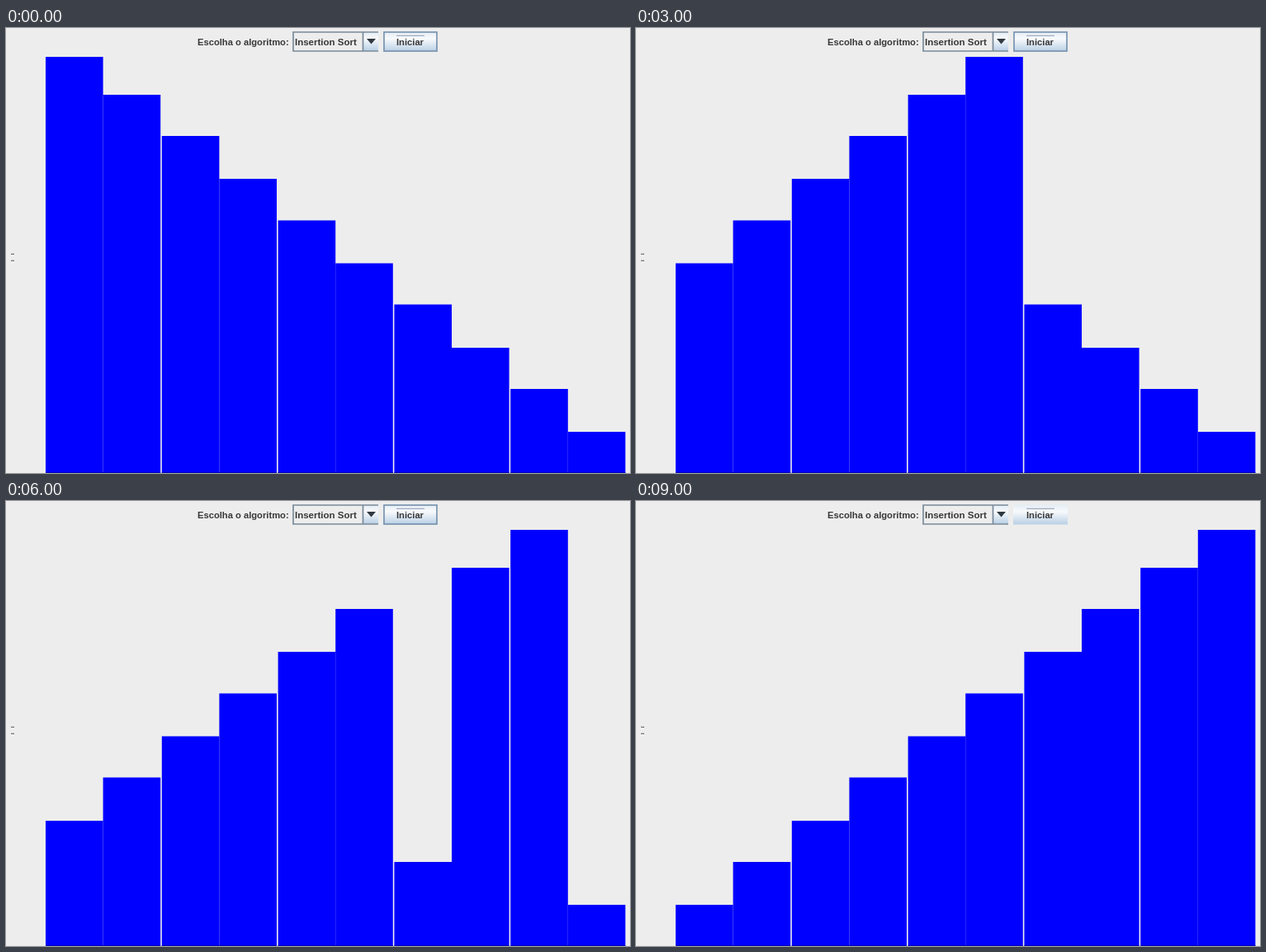
Recreate the animation shown at these times as an HTML page. Size 756 by 540 pixels, loop 9.2 s.

```html
<!DOCTYPE html>
<html lang="pt">
<head>
<meta charset="utf-8">
<title>Insertion Sort</title>
<style>
  html, body { margin: 0; width: 100%; height: 100%; overflow: hidden; background: #ededed; }
  svg { display: block; width: 756px; height: 540px; }
  text { font-family: "Liberation Sans", Arial, sans-serif; font-weight: bold; fill: #383838; }
  #frame { animation: leave 9200ms step-end infinite; }
  @keyframes leave { 0% { opacity: 1; } 73.9% { opacity: 0; } }
</style>
</head>
<body>
<svg viewBox="0 0 756 540">
  <defs>
    <linearGradient id="steel" x2="0" y2="1">
      <stop offset="0" stop-color="#e4ecf4"/>
      <stop offset=".35" stop-color="#f8fafc"/>
      <stop offset="1" stop-color="#b8cfe5"/>
    </linearGradient>
  </defs>
  <rect width="756" height="540" fill="#ededed"/>

  <path d="M6 274.5h4M6 282.5h4" stroke="#777" stroke-width="1.6"/>
  <path d="M6 276h4M6 284h4" stroke="#fff"/>

  <text x="232" y="21" font-size="11.2">Escolha o algoritmo:</text>

  <rect x="433" y="5" width="18" height="23" fill="url(#steel)"/>
  <path d="M451 5H348V28H451M432.5 5V28" fill="none" stroke="#7a8a99" stroke-width="1.7"/>
  <path d="M437 13h11l-5.5 6.5z" fill="#303840"/>
  <text x="350" y="20.5" font-size="11.5">Insertion Sort</text>

  <rect x="457" y="4.5" width="66" height="24" fill="url(#steel)"/>
  <rect id="frame" x="458" y="5" width="64" height="23" fill="none" stroke="#7a94b0" stroke-width="1.7"/>
  <path d="M473 9.3h34" stroke="#8c9db2"/>
  <text x="473" y="21" font-size="11.2">Iniciar</text>

  <g id="bars" fill="#00f"></g>
  <path id="base" stroke="#0000b4"/>
</svg>
<script>
const STEP = 200, LOOP = 9200;
const tops = [490, 438, 388, 335.5, 285.5, 233.5, 183, 131, 81, 35];
const group = document.getElementById("bars");

// Bars touch in pairs, with a thin gap between the pairs.
const bars = tops.map((_, i) => {
  const bar = document.createElementNS("http://www.w3.org/2000/svg", "rect");
  bar.setAttribute("x", 48 + 140.8 * (i >> 1) + 69.6 * (i % 2));
  bar.setAttribute("width", 69.6);
  return group.appendChild(bar);
});
document.getElementById("base").setAttribute("d",
  [0, 1, 2, 3, 4].map(k => `M${48 + 140.8 * k} 539.5h139.2`).join(""));

// Record the list after every swap of the insertion sort.
const list = tops.map((_, i) => 9 - i);
const states = [list.slice()];
for (let i = 1; i < list.length; i++) {
  for (let j = i; j > 0 && list[j] < list[j - 1]; j--) {
    [list[j - 1], list[j]] = [list[j], list[j - 1]];
    states.push(list.slice());
  }
}

let shown = -1;
function draw() {
  const step = Math.floor(performance.now() % LOOP / STEP);
  if (step !== shown) {
    shown = step;
    states[step].forEach((value, i) => {
      bars[i].setAttribute("y", tops[value]);
      bars[i].setAttribute("height", 540 - tops[value]);
    });
  }
  requestAnimationFrame(draw);
}
draw();
</script>
</body>
</html>
```
